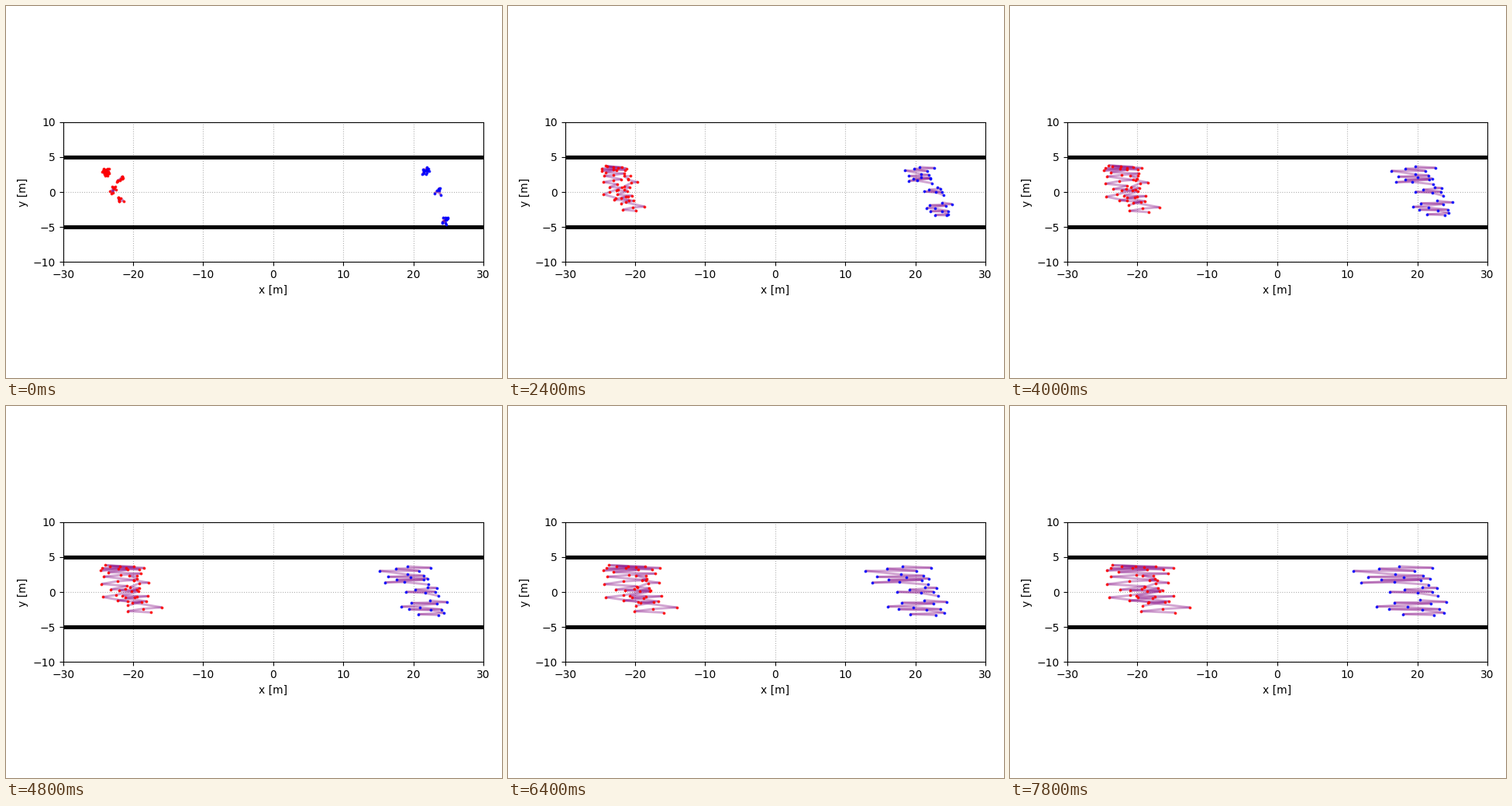
A matplotlib script that plays this animation: 640 by 480 pixels, repeating every 8000 ms.

```python
import numpy as np
import matplotlib.pyplot as plt
from matplotlib.animation import FuncAnimation
from matplotlib.collections import LineCollection

W, H, DPI = 640, 480, 100
FRAMES, STEP = 40, 200
LOOP = FRAMES * STEP / 1000
GOLDEN = (5 ** 0.5 - 1) / 2
PUSH = 1.3     # metres the rearmost walkers are shoved back at first
RELAX = 1.2    # seconds for a packed crowd to spread out

rng = np.random.default_rng(7)


class Crowd:
    """Linked walkers that burst from one spot and walk at different speeds.

    reach: distance walked by the last and the first walker over the loop
    rows:  heights of the top and bottom row once spread out
    bend:  above 1, walkers pack towards the top row
    """

    def __init__(self, ax, color, heading, count, centre, reach, rows, bend=1):
        i = np.arange(count)
        # golden-ratio ranks down the rows: an even cloud with zigzag links
        rank = (0.5 + i * GOLDEN) % 1
        depth = ((i + 0.5) / count) ** bend
        walked = reach[0] + (reach[1] - reach[0]) * rank ** 1.3
        self.heading = heading
        self.push = PUSH * (1 - rank)
        self.speed = (walked + self.push) / LOOP
        self.x = centre[0] + rng.uniform(-0.5, 0.5, count)
        self.y = centre[1] + rng.uniform(-0.55, 0.55, count)
        self.row = (rows[0] + (rows[1] - rows[0]) * depth
                    + rng.uniform(-0.2, 0.2, count))
        self.links = LineCollection([], colors="purple", alpha=0.35,
                                    linewidths=2.1, zorder=2.5)
        ax.add_collection(self.links, autolim=False)
        self.dots, = ax.plot([], [], "o", color=color, ms=2.7, mew=0,
                             alpha=0.88, zorder=3)

    def draw(self, t):
        spread = 1 - np.exp(-t / RELAX)
        x = self.x + self.heading * (self.speed * t - self.push * spread)
        y = self.y + (self.row - self.y) * spread
        p = np.column_stack([x, y])
        self.links.set_segments(np.stack([p[:-1], p[1:]], axis=1))
        self.dots.set_data(x, y)
        return self.links, self.dots


fig = plt.figure(figsize=(W / DPI, H / DPI), dpi=DPI)
ax = fig.add_axes([73.6 / W, 149.55 / H, 542.4 / W, 180.8 / H])
ax.set(xlim=(-30, 30), ylim=(-10, 10), xlabel="x [m]", ylabel="y [m]",
       yticks=range(-10, 11, 5))
ax.grid(linestyle=":")
for wall in (-5, 5):
    ax.plot([-30, 30], [wall, wall], color="black", lw=3.7)

crowds = [
    Crowd(ax, "red", 1, 24, (-23.9, 2.9), (-0.7, 9.9), (3.7, -1.6), bend=2.4),
    Crowd(ax, "red", 1, 9, (-21.9, 1.8), (2.4, 6.2), (2.6, 0.2)),
    Crowd(ax, "red", 1, 9, (-22.9, 0.3), (1.0, 8.6), (0.7, -2.0)),
    Crowd(ax, "red", 1, 8, (-21.8, -1.3), (1.6, 9.4), (-0.4, -3.3)),
    Crowd(ax, "blue", -1, 15, (21.75, 3.0), (-0.8, 11.7), (3.6, 1.1)),
    Crowd(ax, "blue", -1, 7, (23.5, 0.1), (-0.3, 8.0), (1.0, -0.6)),
    Crowd(ax, "blue", -1, 12, (24.5, -4.1), (0.0, 11.4), (-1.0, -3.4)),
]


def update(i):
    return [art for c in crowds for art in c.draw(i * STEP / 1000)]


anim = FuncAnimation(fig, update, frames=FRAMES, interval=STEP,
                     repeat=True, repeat_delay=0, blit=False)
plt.show()
```
